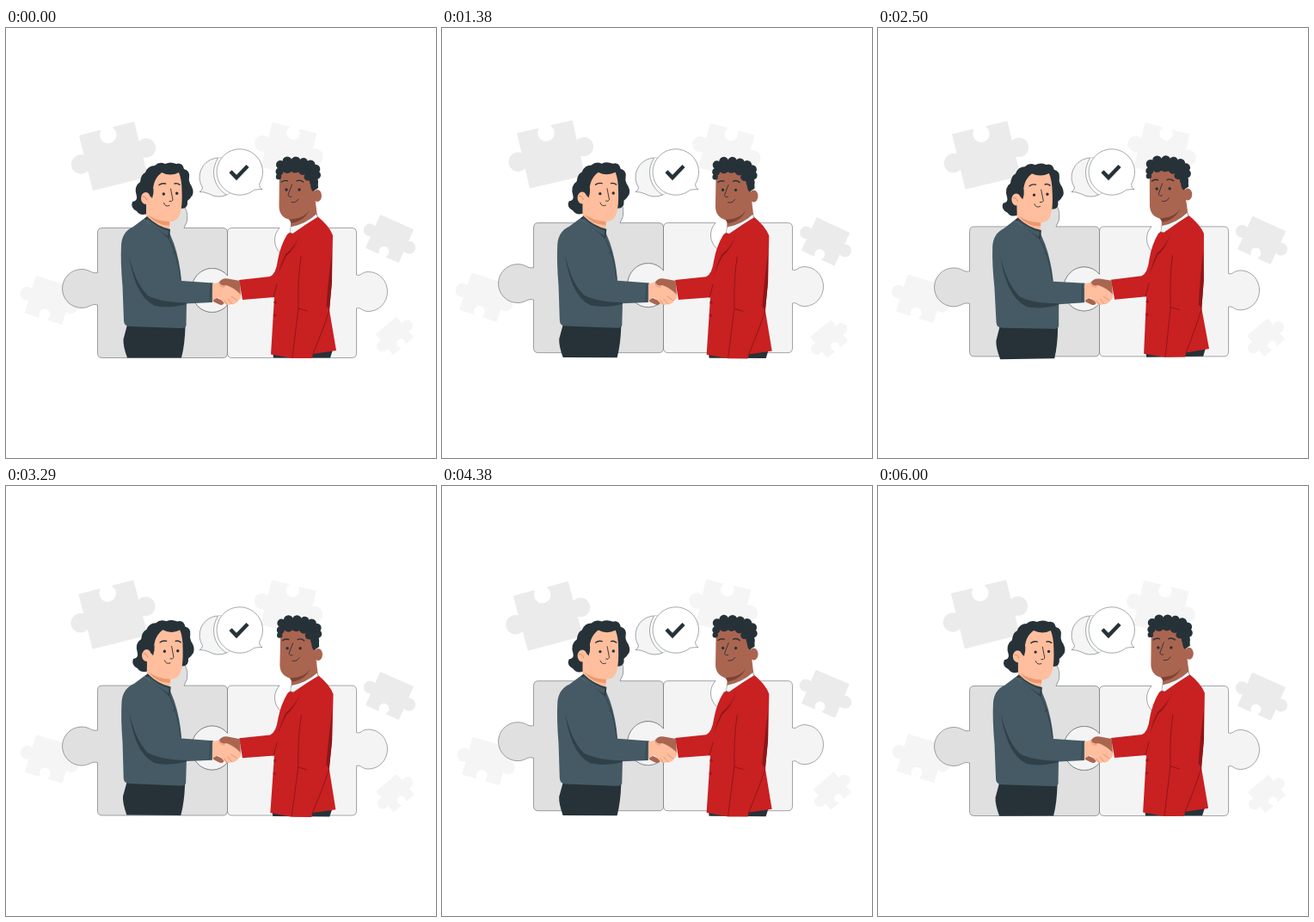
These frames come from a looping animation (500x500 px, 6040 ms). An HTML page:

```html
<!DOCTYPE html>
<html lang="en">
<head>
<meta charset="utf-8">
<title>Handshake</title>
<style>
  html, body { margin: 0; width: 100%; height: 100%; overflow: hidden; background: #fff; }
  svg { display: block; width: 100%; height: 100%; }
  .line { fill: none; stroke: #263238; stroke-width: .9; stroke-linecap: round; stroke-linejoin: round; }
  .thin { stroke: #263238; stroke-width: .42; }
  .dark { fill: #263238; }
  .slate { fill: #455a64; }
  .slate-shade { fill: #2f4048; }
  .light { fill: #ffbe9d; }
  .brown { fill: #aa6550; }
  .red { fill: #c92022; }
  .red-shade { fill: #8c1719; }
</style>
</head>
<body>
<svg viewBox="0 0 500 500">
  <defs>
    <clipPath id="backClip"><circle cx="247.500" cy="173.500" r="22.500"/></clipPath>
  </defs>

  <g id="backdrop"></g>

  <g id="puzzle" class="thin">
    <path fill="#e0e0e0" d="M112 232.500H171A22 22 0 1 1 207 232.500H252Q257.500 232.500 257.500 238V288
      A24 25.500 0 1 0 257.500 322V378Q257.500 383.500 252 383.500H112Q106.500 383.500 106.500 378V322
      C99 320 97 325.500 88 325.500A22.500 22.500 0 0 1 88 280.500C98 280.500 99 286 106.500 284.500V238Q106.500 232.500 112 232.500Z"/>
    <path fill="#f4f4f4" d="M263 232.500H318A21 21 0 1 0 349 232.500H402Q407.500 232.500 407.500 238V287
      C413 289 413 283.500 421.500 283.500A22 23 0 0 1 421.500 329.500C413 329.500 413 324 407.500 326V378
      Q407.500 383.500 402 383.500H263Q257.500 383.500 257.500 378V322A24 25.500 0 1 1 257.500 288V238Q257.500 232.500 263 232.500Z"/>
  </g>

  <g id="bubbles" class="thin" fill="#fff">
    <path fill="#f5f5f5" d="M228.500 185.500A22.500 22.500 0 1 1 236 192.800Q231 190.500 225 190.500Q228.500 189 228.500 185.500Z"/>
    <circle cx="271.500" cy="168" r="30" clip-path="url(#backClip)"/>
    <path d="M294.500 181.500A26.700 26.700 0 1 0 288.500 188.300Q293 187.500 298 187.500Q294.500 186 294.500 181.500Z"/>
    <path d="M261 166.800L268 174L281 160.500" fill="none" style="stroke-width:4.500"/>
  </g>

  <g id="people">
    <g id="leftMan">
      <path class="dark" d="M141 345L208.500 347Q208 368 204 383.500H141Q136 370 136.500 362Z"/>
      <path class="dark" d="M164 216Q156 219 152 213Q144 209 147 202Q153 201 152 196Q148 184 156 179Q157 170 162 168
        Q165 160 173 160Q178 155 185 158Q191 155 198 158Q205 156 207 164Q214 166 213 173Q212 177 214 181
        Q219 188 217 194Q214 199 211 201Q212 210 204 210L190 200L170 200Z"/>
      <path class="light" d="M163 200V222L176 233L189 236L192 222L190 205Z"/>
      <path class="light" d="M171 187C172 178 175 173 181 168Q191 173 201 168Q204.500 176 204.500 190
        C205 205 204 215 200 221Q196 226 188 225C179 224 167 217 165 204Z"/>
      <ellipse class="light" cx="162.500" cy="198" rx="5.500" ry="7"/>
      <path class="line" style="stroke:#d98465" d="M159 196Q162 195 164 200"/>
      <path class="dark" d="M169 183Q173 172 182 167L170 166L164 184Q166 194 170 198Q172 192 171.500 187Z"/>
      <path fill="#eb996e" d="M165 217Q176 225 190 225.200L190 229.500Q175 230 165 217Z"/>
      <circle class="dark" cx="183.300" cy="193" r="1.700"/>
      <circle class="dark" cx="198.700" cy="192.300" r="1.700"/>
      <path class="line" style="stroke-width:1.400" d="M178 182.500Q181 180 185.500 181M196 181Q199 179.800 202 182.300"/>
      <path class="line" d="M191.500 187L194 200Q193 202.500 190 201.500M183.500 203.500Q185 208.500 190 206.500"/>

      <path class="slate" d="M160 222Q173 233 190 238L195 250Q202 270 204 294L241 296.500L240 319L210 320.500L209.500 346
        Q209 349.500 202 349L144 347Q137 347 137 340L135.500 300Q133 272 134 252Q135 237 148 231Z"/>
      <path class="slate-shade" d="M143 265C148 285 154 300 165 311Q180 319 210 319.500L210 321Q190 326.500 173 323Q160 317 152 299Q145 281 143 265Z"/>
      <path class="slate-shade" d="M160 222L164 219Q176 231 191 234L190 246Q180 236 160 222Z"/>
      <path class="slate" d="M162 223.500L165 222Q176 232 189 236L188 242Q177 235 162 223.500Z"/>
      <path class="line" style="stroke-width:.6" d="M190 246Q200 266 203 292M194 262L196 261M238 297L237 318"/>
    </g>

    <g id="rightMan">
      <path class="dark" d="M310 376L380 374L377 383.500H311Z"/>
      <path class="brown" d="M331 218V235L345 232L362 219L359 195Z"/>
      <path class="brown" d="M318 164L317.500 208Q318 220 330 223Q345 224 352 212Q359 203 359 182L346 164Z"/>
      <ellipse class="brown" cx="362" cy="195" rx="5" ry="7"/>
      <path fill="#7f4234" d="M329 222.500Q347 222 353 211Q348 224 332 227Z"/>
      <g id="curls" class="dark">
        <path d="M318 156L330 153L350 155L362 166L363 186L357 190Q354 188 354 180L347 168L318 166Z"/>
      </g>
      <circle class="dark" cx="326" cy="188" r="1.700"/>
      <circle class="dark" cx="341" cy="188" r="1.700"/>
      <path class="line" style="stroke-width:1.400" d="M320.500 179Q323.500 176.500 327.500 177.800M338 177.800Q342 176 345.500 179"/>
      <path class="line" d="M332.500 182L328 194Q328.500 197 332 196M332 202.500Q337 204 340 199"/>

      <path class="red" d="M331 237L361 218Q376 230 380 241L379 295L376 328L384 375L357 379L356 384L333 384L308 379.500
        L312 313L275 316L271 293L307 289Q314 286 316 270Q319 253 327 240Z"/>
      <path fill="#f5f5f5" class="thin" style="stroke-width:.3" d="M331 231Q348 228 361 216L363 222Q348 227 336 240L330 238Z"/>
      <path class="red" d="M362 220L366 224Q351 232 341 247L331 252L332 240Q349 228 362 220Z"/>
      <path class="red-shade" d="M342 238Q337 254 325 263Q319 275 316 288Q320 276 326 265Q337 256 342 238Z"/>
      <path class="red-shade" d="M379 260Q374.500 294 372.500 323L376 328L379 295Z"/>
      <path class="line" style="stroke:#751315;stroke-width:.7" d="M343 266Q339 292 340 326L333 383M340 326L350 329M311 313L315 298M376 328Q369 350 357 379"/>
      <g fill="none" stroke="#751315" stroke-width=".7">
        <circle cx="313" cy="319" r="1.300"/>
        <circle cx="312.500" cy="334" r="1.300"/>
      </g>
    </g>

    <g id="hands">
      <path class="brown" d="M272 294L258 291.500Q250 290.500 247 297L250 303Q258 300 263 307L273 313Z"/>
      <path class="brown" d="M241 312L254 318Q253 324 247 321L241 318Z"/>
      <path class="light" d="M240 297.500L248 295.500Q250 301 256 299Q265 302 272 309Q275 314 270 317Q267 322 262 321
        Q256 324 252 318L247 313L240 317Z"/>
      <path class="line" style="stroke:#d98465;stroke-width:.7" d="M248 296Q248 302 254 301M262 312L269 317M258 315L263 321M254 317L257 321.500"/>
    </g>
  </g>
</svg>

<script>
const LOOP = 6040;
const NS = 'http://www.w3.org/2000/svg';
const $ = id => document.getElementById(id);

function add(parent, tag, attrs) {
  const el = document.createElementNS(NS, tag);
  for (const k in attrs) el.setAttribute(k, attrs[k]);
  parent.append(el);
}

// Square of half-width h with knobs left and right and one notch, at the top or bottom.
function jigsaw(x, y, h, r, turn, notch, fill) {
  const n = r * .76;
  const arc = (sweep, px, py) => `A${r} ${r} 0 1 ${sweep} ${px} ${py}`;
  const top = notch === 'top' ? `H${-n}${arc(0, n, -h)}` : '';
  const bottom = notch === 'bottom' ? `H${n}${arc(0, -n, h)}` : '';
  const d = `M${-h} ${-h}${top}H${h}V${-n}${arc(1, h, n)}V${h}${bottom}H${-h}V${n}${arc(1, -h, -n)}Z`;
  add($('backdrop'), 'path', {
    d, fill, stroke: fill, 'stroke-width': 1.5, 'stroke-linejoin': 'round',
    transform: `translate(${x} ${y}) rotate(${turn})`
  });
}

jigsaw(125, 149, 32.3, 10.5, -14, 'top', '#ebebeb');
jigsaw(329, 142, 26, 8.5, 14, 'top', '#f5f5f5');
jigsaw(50, 316.5, 22, 7.2, 17, 'bottom', '#f5f5f5');
jigsaw(446, 245, 20.5, 6.7, 24, 'bottom', '#ebebeb');
jigsaw(452, 358, 15, 5.8, -40, 'bottom', '#f5f5f5');

const curls = [
  [319, 159, 5], [327, 155, 5.5], [337, 155, 5.5], [346, 156, 5], [354, 159, 5.5],
  [360, 164, 5.3], [361, 171, 5], [358, 179, 5], [318, 167, 4.5], [317, 173, 3.2],
  [327, 163, 6], [336, 163, 5.5], [345, 166, 5], [351, 173, 4.5]
];
for (const [cx, cy, r] of curls) add($('curls'), 'circle', { cx, cy, r });

function draw(now) {
  const a = (now % LOOP) / LOOP * 2 * Math.PI;
  const lift = 3 * (1 - Math.cos(2 * a));
  $('backdrop').setAttribute('transform', `rotate(${Math.sin(a)} 250 250)`);
  $('puzzle').setAttribute('transform', `translate(0 ${-lift})`);
  $('people').setAttribute('transform', `rotate(${Math.sin(2 * a)} 257 307)`);
}

const start = performance.now();
function tick() {
  draw(performance.now() - start);
  requestAnimationFrame(tick);
}
tick();
</script>
</body>
</html>
```
